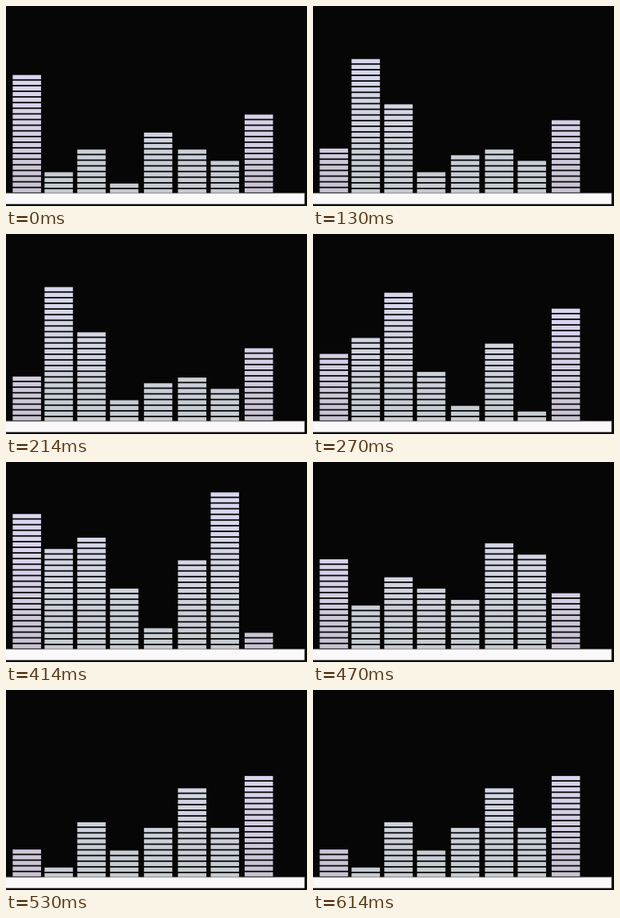
Write an HTML page with a canvas that moves like this. It is 377 px wide and 251 px high and loops after 0.67 s.

```html
<!DOCTYPE html>
<html lang="en">
<head>
<meta charset="utf-8">
<title>Equalizer</title>
<style>
html, body { margin: 0; width: 100%; height: 100%; overflow: hidden; background: #060606; }
canvas { display: block; width: 100%; height: 100%; }
</style>
</head>
<body>
<canvas id="stage" width="377" height="251"></canvas>
<script>
const ctx = document.getElementById('stage').getContext('2d');
const LOOP = 670, FLOOR = 235, PITCH = 7.1, LIT = 5.3, BAR_W = 35.5;
const lefts = [8.4, 48.3, 89.3, 130.3, 172.8, 215.4, 256.4, 298.9];

// Lit segments per bar; each level holds until its end time, then jumps.
const levels = [
  { end: 130, lit: [21, 4, 8, 2, 11, 8, 6, 14] },
  { end: 270, lit: [8, 24, 16, 4, 7, 8, 6, 13] },
  { end: 330, lit: [12, 15, 23, 9, 3, 14, 2, 20] },
  { end: 470, lit: [24, 18, 20, 11, 4, 16, 28, 3] },
  { end: 530, lit: [16, 8, 13, 11, 9, 19, 17, 10] },
  { end: LOOP, lit: [5, 2, 10, 5, 9, 16, 9, 18] }
];

function gradient(...stops) {
  const g = ctx.createLinearGradient(0, 38, 0, FLOOR);
  stops.forEach((c, i) => g.addColorStop(i / (stops.length - 1), c));
  return g;
}

// The outer bars are tinted and sit slightly higher than the inner ones.
const outer = { base: 235.7, fill: gradient('#dcd8f4', '#d8d2ea', '#c8c2d1') };
const inner = { base: 237, fill: gradient('#d8d8f2', '#d2d5e2', '#c4cacf') };

function drawBar(x, count, { base, fill }) {
  ctx.fillStyle = fill;
  for (let n = 1; n <= count; n++) {
    const y = base - n * PITCH;
    ctx.fillRect(x, y, BAR_W, Math.min(LIT, FLOOR - y));
  }
}

function drawFloor() {
  ctx.fillStyle = '#77777a';
  ctx.fillRect(0, 234.5, 374.3, 14);
  ctx.fillStyle = '#faf8f8';
  ctx.fillRect(0, 235.3, 373.6, 13.2);
}

function draw(time) {
  const t = time % LOOP;
  const { lit } = levels.find(level => t < level.end);
  ctx.fillStyle = '#060606';
  ctx.fillRect(0, 0, 377, 251);
  lit.forEach((count, i) => {
    const isOuter = i === 0 || i === lit.length - 1;
    drawBar(lefts[i], count, isOuter ? outer : inner);
  });
  drawFloor();
}

const start = performance.now();
function tick() {
  draw(performance.now() - start);
  requestAnimationFrame(tick);
}
tick();
</script>
</body>
</html>
```
